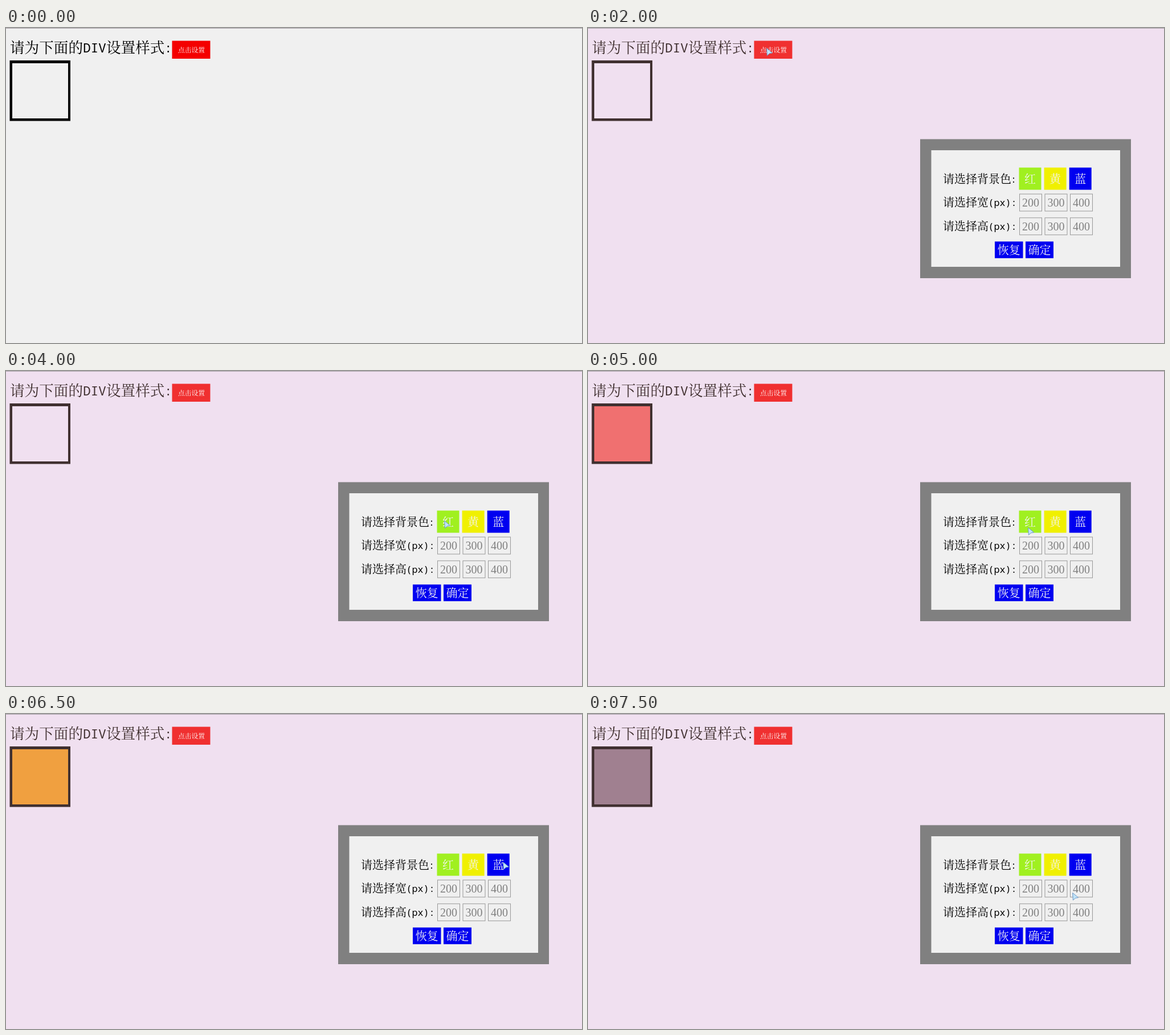
Write an HTML page that moves like this. It is 1011 by 554 pixels and loops after 8 s.

```html
<!DOCTYPE html>
<html lang="zh-CN">
<head>
<meta charset="utf-8">
<title>样式设置</title>
<style>
  html, body { margin: 0; width: 100%; height: 100%; overflow: hidden; background: #f0f0f0; }
  svg { display: block; width: 1011px; height: 554px; }
  text { font: 500 20px "Noto Serif CJK SC", "Noto Sans CJK SC", "Noto Sans CJK", serif; white-space: pre; }
  #title text { font-size: 25.6px; font-weight: 300; }
  #title text.mono { font: 400 22.4px "Noto Sans Mono", monospace; }
  text.mono { font: 500 16.7px "Noto Sans Mono", monospace; }
  text.num { font: 400 20px "Liberation Serif", serif; fill: #808080; }
  text.mid { text-anchor: middle; }
  #set text { font-size: 11.8px; }
</style>
</head>
<body>
<svg viewBox="0 0 1011 554">
  <rect id="page" width="1011" height="554"/>
  <rect width="1011" height="1" fill="#a8a0a8"/>
  <g id="title"></g>
  <g id="set">
    <rect id="setBox" x="291.5" y="22.5" width="67" height="31.5"/>
    <text class="mid" x="325.5" y="42.6" fill="#fff">点击设置</text>
  </g>
  <rect id="fill" x="10" y="61" width="100" height="99"/>
  <path id="frame" fill-rule="evenodd" d="M6.5 57H113V163.5H6.5ZM11 62V159H109V62Z"/>
  <g id="dialog">
    <rect x="583" y="195.5" width="370" height="244.5" fill="#808080"/>
    <rect x="602.5" y="215" width="331.5" height="205" fill="#f0f0f0"/>
  </g>
  <path id="pointer" d="M.6 .6L10.5 8.8L5.6 9.8L1.4 13.4Z" fill="#c0e4f8" stroke="#7098c8" stroke-linejoin="round"/>
</svg>
<script>
const $ = id => document.getElementById(id);

function add(parent, tag, attrs, content = "") {
  const node = document.createElementNS("http://www.w3.org/2000/svg", tag);
  for (const key in attrs) node.setAttribute(key, attrs[key]);
  node.textContent = content;
  parent.append(node);
}

const title = $("title"), dialog = $("dialog");
const label = (x, y, s, cls = "") => add(dialog, "text", { x, y, class: cls }, s);

function block(x, y, width, height, fill, s) {
  add(dialog, "rect", { x, y, width, height, fill });
  add(dialog, "text", { x: x + width / 2, y: y + height / 2 + 7.6, class: "mid", fill: "#f4f4f4" }, s);
}

add(title, "text", { x: 7, y: 43.6 }, "请为下面的");
add(title, "text", { x: 135.3, y: 42.6, class: "mono" }, "DIV");
add(title, "text", { x: 176, y: 43.6 }, "设置样式");
add(title, "text", { x: 278, y: 42.6, class: "mono" }, ":");

label(623, 272.6, "请选择背景色");
label(742, 271.5, ":", "mono");
["宽", "高"].forEach((side, row) => {
  const y = 314.4 + row * 41.8;
  label(623, y, "请选择" + side);
  label(702.5, y - 1, "(px):", "mono");
  [200, 300, 400].forEach((n, i) => {
    const x = 757.5 + i * 44.5;
    add(dialog, "rect", { x, y: y - 22.4, width: 39, height: 30, fill: "none", stroke: "#989898" });
    label(x + 19.5, y - 0.4, n, "num mid");
  });
});
[["红", "#a0f020"], ["黄", "#f0f000"], ["蓝", "#0000f0"]].forEach(([s, color], i) =>
  block(756.5 + i * 44.1, 245.5, 39, 39, color, s));
block(714, 375.5, 49.5, 29.3, "#0000f0", "恢复");
block(768, 375.5, 49, 29.3, "#0000f0", "确定");

// start time, pointer x, pointer y
const path = [
  [0, -40, -40], [500, 306, 204], [1000, 300, 60], [1500, 313, 35],
  [3000, 600, 180], [3500, 750, 262], [4000, 769, 263], [4500, 772, 268],
  [5000, 772, 275], [5500, 807, 262], [6500, 872, 260], [7000, 873, 261],
  [7500, 850, 314]
];
const fills = [[0, "none"], [4500, "#f07070"], [5500, "#f0a040"], [7000, "#a08090"]];
const at = (steps, t) => steps.findLast(step => step[0] <= t);

function draw(now) {
  const t = now % 8000, open = t >= 2000;
  const ink = open ? "#403030" : "#000";
  $("page").setAttribute("fill", open ? "#f0e0f0" : "#f0f0f0");
  $("setBox").setAttribute("fill", open ? "#f03030" : "#f40000");
  title.setAttribute("fill", ink);
  $("frame").setAttribute("fill", ink);
  dialog.style.display = open ? "" : "none";
  $("fill").setAttribute("fill", at(fills, t)[1]);
  const [, x, y] = at(path, t);
  $("pointer").setAttribute("transform", `translate(${x} ${y})`);
}

const start = performance.now();
function tick() {
  draw(performance.now() - start);
  requestAnimationFrame(tick);
}
tick();
</script>
</body>
</html>
```
